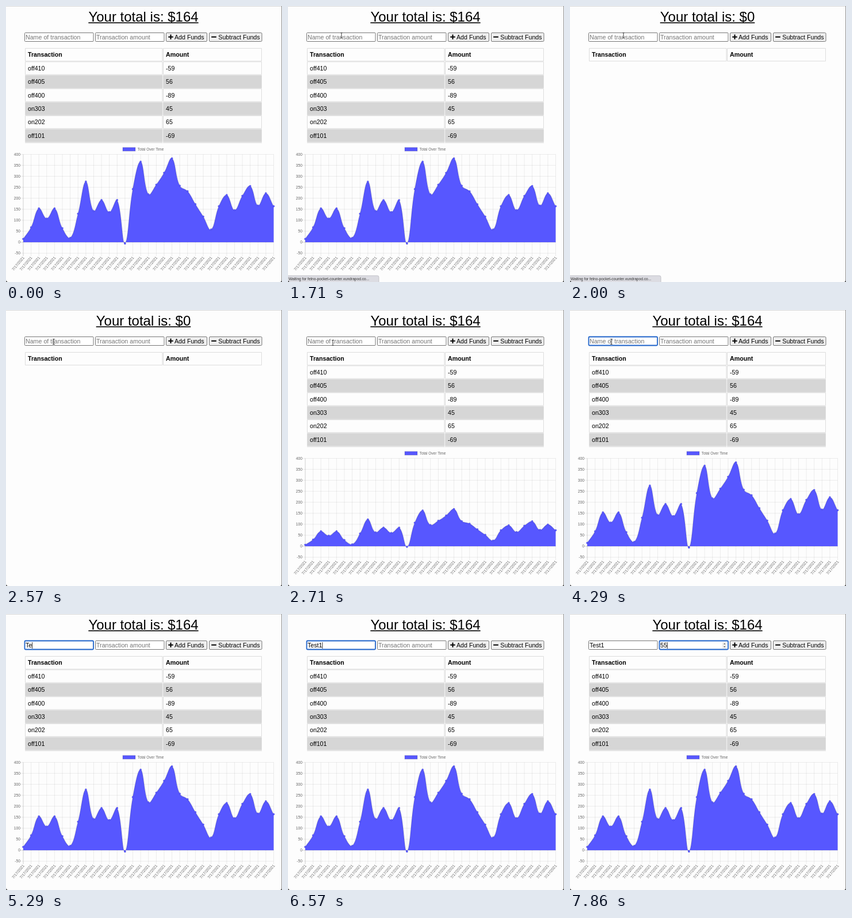
These frames come from a looping animation (480x479 px, 8 s). An HTML page with a canvas:

```html
<!DOCTYPE html>
<html lang="en">
<head>
<meta charset="utf-8">
<title>Budget</title>
<style>
html, body { margin: 0; width: 100%; height: 100%; overflow: hidden; background: #fdfdfd; }
canvas { display: block; }
</style>
</head>
<body>
<canvas width="480" height="479"></canvas>
<script>
const ctx = document.querySelector('canvas').getContext('2d');
const LOOP = 8000, BLUE = '#5757ff', FAINT = 'rgba(0,0,0,.1)';
const UI = 10.67, SMALL = 6.7;

const rows = [['off410', -59], ['off405', 56], ['off400', -89], ['on303', 45], ['on202', 65], ['off101', -69]];
const totals = [15, 68, 154, 108, 154, 64, 20, 130, 276, 142, 192, 137, 192, -6, 242, 367, 218,
  262, 316, 382, 257, 232, 173, 117, 58, 164, 215, 146, 211, 256, 167, 223, 164];

// Page loads: blank from, data shown at
const loads = [[430, 860], [2000, 2575]];
const statusTimes = [[140, 860], [1430, 2290]];
const pointer = [[1140, 93, 51], [2290, 93, 51], [2710, 78, 57], [3430, 72, 55], [5000, 72, 55]];
const NAME_FOCUS = 3570, AMOUNT_FOCUS = 6860;
const nameKeys = [5000, 5290, 5570, 5860, 6290], amountKeys = [7290, 7570];

const plot = { left: 30, right: 465.5, top: 257.5, zero: 410, bottom: 429 };
const step = (plot.right - plot.left) / (totals.length - 1);
const unit = (plot.zero - plot.top) / 400;
const points = totals.map((v, i) => ({ x: plot.left + i * step, y: plot.zero - v * unit }));

const within = (t, spans) => spans.some(([a, b]) => t >= a && t < b);
const clamp = (v, min, max) => Math.min(max, Math.max(min, v));

function drawText(s, x, y, { size = UI, color = '#000', align = 'left', weight = 'normal' } = {}) {
  ctx.font = `${weight} ${size}px "Liberation Sans", Arial, sans-serif`;
  ctx.fillStyle = color;
  ctx.textAlign = align;
  ctx.fillText(s, x, y);
}

function drawRect(x, y, w, h, color) {
  ctx.fillStyle = color;
  ctx.fillRect(x, y, w, h);
}

function drawLine(x1, y1, x2, y2, color, width = 1) {
  ctx.strokeStyle = color;
  ctx.lineWidth = width;
  ctx.beginPath();
  ctx.moveTo(x1, y1);
  ctx.lineTo(x2, y2);
  ctx.stroke();
}

function drawBox(x, y, w, h, fill, stroke, radius = 0, width = 1) {
  ctx.beginPath();
  ctx.roundRect(x, y, w, h, radius);
  ctx.fillStyle = fill;
  ctx.fill();
  ctx.strokeStyle = stroke;
  ctx.lineWidth = width;
  ctx.stroke();
}

function drawTitle(total) {
  const s = 'Your total is: $' + total;
  drawText(s, 239, 26.5, { size: 24, align: 'center' });
  const half = ctx.measureText(s).width / 2;
  drawRect(239 - half, 28.4, half * 2, 1.6, '#000');
}

function drawField(x, placeholder, value, focused, caretAge) {
  if (focused) drawBox(x + .5, 46.5, 119.5, 15, '#fff', '#1f63c9', 1.5, 1.8);
  else drawBox(x + .5, 46.5, 119.5, 15, '#fff', '#767676', 1);
  drawText(value || placeholder, x + 2, 57.6, { color: value ? '#000' : '#757575' });
  if (focused && caretAge % 1000 < 500) {
    const w = value ? ctx.measureText(value).width : 0;
    drawRect(x + 2 + w, 49, .8, 11, '#000');
  }
}

function drawSpinner() {
  drawBox(265, 49, 7, 10.5, '#eee', '#e4e4e4', 1, .5);
  ctx.fillStyle = '#555';
  for (const dir of [-1, 1]) {
    ctx.beginPath();
    ctx.moveTo(267, 54.2 + dir * 1.7);
    ctx.lineTo(270.4, 54.2 + dir * 1.7);
    ctx.lineTo(268.7, 54.2 + dir * 3.8);
    ctx.fill();
  }
}

function drawForm(t) {
  const typed = (s, keys) => s.slice(0, keys.filter(k => t >= k).length);
  const age = (focus, keys) => t - Math.max(focus, ...keys.filter(k => t >= k));
  const onAmount = t >= AMOUNT_FOCUS;
  drawField(32, 'Name of transaction', typed('Test1', nameKeys),
    t >= NAME_FOCUS && !onAmount, age(NAME_FOCUS, nameKeys));
  drawField(155, 'Transaction amount', typed('55', amountKeys), onAmount, age(AMOUNT_FOCUS, amountKeys));
  if (onAmount) drawSpinner();

  drawBox(278.5, 46.5, 71, 15, '#efefef', '#767676', 1.5);
  drawRect(282.3, 52.7, 8.4, 2, '#000');
  drawRect(285.5, 49.5, 2, 8.4, '#000');
  drawText('Add Funds', 293, 57.6);
  drawBox(353.5, 46.5, 91.5, 15, '#efefef', '#767676', 1.5);
  drawRect(357.2, 52.7, 8.6, 2, '#000');
  drawText('Subtract Funds', 369.3, 57.6);
}

function drawRow(i, name, amount, weight) {
  const y = 73.5 + 23.4 * i;
  const fill = i && i % 2 === 0 ? '#d6d6d6' : '#fdfdfd';
  drawBox(33.5, y, 238.5, 22.2, fill, '#ddd');
  drawBox(273.5, y, 171, 22.2, fill, '#ddd');
  drawText(name, 38, y + 14.8, { weight });
  drawText(amount, 278, y + 14.8, { weight });
}

function drawTable(loaded) {
  ctx.save();
  ctx.beginPath();
  ctx.rect(0, 70, 480, 168);
  ctx.clip();
  drawRow(0, 'Transaction', 'Amount', 'bold');
  if (loaded) {
    rows.forEach(([name, amount], i) => drawRow(i + 1, name, amount));
    drawRow(7, '', '');
  }
  ctx.restore();
}

// Smooth curve with tension .4, control points kept inside the plot
const controls = points.map((p, i) => {
  const a = points[i - 1] || p, b = points[i + 1] || p;
  const da = Math.hypot(p.x - a.x, p.y - a.y), db = Math.hypot(b.x - p.x, b.y - p.y);
  const at = k => ({
    x: clamp(p.x + k * (b.x - a.x), plot.left, plot.right),
    y: clamp(p.y + k * (b.y - a.y), plot.top, plot.bottom)
  });
  return { before: at(-.4 * da / (da + db)), after: at(.4 * db / (da + db)) };
});

function drawArea(grow) {
  const { left, right, zero } = plot;
  const scaled = y => zero + (y - zero) * grow;
  const trace = () => {
    ctx.beginPath();
    ctx.moveTo(left, scaled(points[0].y));
    points.slice(1).forEach((p, i) => {
      const a = controls[i].after, b = controls[i + 1].before;
      ctx.bezierCurveTo(a.x, scaled(a.y), b.x, scaled(b.y), p.x, scaled(p.y));
    });
  };
  trace();
  ctx.lineTo(right, zero);
  ctx.lineTo(left, zero);
  ctx.fillStyle = BLUE;
  ctx.fill();

  trace();
  ctx.strokeStyle = FAINT;
  ctx.lineWidth = 1.6;
  ctx.stroke();

  ctx.lineWidth = .6;
  for (const p of points) {
    ctx.beginPath();
    ctx.arc(p.x, scaled(p.y), 1.7, 0, 7);
    ctx.fill();
    ctx.stroke();
  }
}

function drawChart(grow) {
  const label = { size: SMALL, color: '#666' };
  const gridColor = main => main ? 'rgba(0,0,0,.25)' : FAINT;
  drawBox(203, 245.5, 22, 6.3, BLUE, FAINT, 0, 1.4);
  drawText('Total Over Time', 228.7, 251, { ...label, size: 6.5 });

  for (let v = -50; v <= 400; v += 50) {
    const y = plot.zero - v * unit;
    drawLine(plot.left - 5, y, plot.right, y, gridColor(v === 0), .7);
    drawText(v, 25, y + 2.4, { ...label, align: 'right' });
  }
  points.forEach(({ x }, i) => {
    drawLine(x, plot.top, x, plot.bottom + 5, gridColor(i === 0), .7);
    ctx.save();
    ctx.translate(x + .5, 435.5);
    ctx.rotate(-50 * Math.PI / 180);
    drawText('7/17/2021', 0, 2.4, { ...label, align: 'right' });
    ctx.restore();
  });
  drawArea(grow);
}

function drawStatus() {
  drawBox(-2, 468, 160, 14, '#dcdce2', '#b9b9bf', 2.5, .8);
  drawText('Waiting for felno-pocket-counter.vundrapod.co...', 1, 476.2, { size: 6.6, color: '#333' });
}

function drawPointer(t) {
  const i = pointer.findIndex(p => t < p[0]);
  if (i < 1) return;
  const [t0, x0, y0] = pointer[i - 1], [t1, x1, y1] = pointer[i];
  const k = (t - t0) / (t1 - t0);
  const x = x0 + (x1 - x0) * k, y = y0 + (y1 - y0) * k;
  const beam = (color, width) => {
    drawLine(x, y - 4, x, y + 4, color, width);
    for (const end of [y - 4.5, y + 4.5]) drawLine(x - 1.8, end, x + 1.8, end, color, width);
  };
  beam('rgba(255,255,255,.8)', 2);
  beam('#222', .9);
}

function drawWindowEdge() {
  drawLine(0, .2, 480, .2, '#aaa', .6);
  drawLine(479.5, 0, 479.5, 479, '#858585', .9);
  ctx.fillStyle = '#222';
  for (const [x, dir] of [[0, 1], [480, -1]]) {
    ctx.beginPath();
    ctx.moveTo(x, 475);
    ctx.quadraticCurveTo(x, 479, x + 4 * dir, 479);
    ctx.lineTo(x, 479);
    ctx.fill();
  }
}

function draw() {
  const t = performance.now() % LOOP;
  const loaded = !within(t, loads);
  const last = loads.filter(l => t >= l[1]).pop();
  const progress = last ? Math.min(1, (t - last[1]) / 1000) : 1;

  drawRect(0, 0, 480, 479, '#fdfdfd');
  drawTitle(loaded ? 164 : 0);
  drawForm(t);
  drawTable(loaded);
  if (loaded) drawChart(1 - (1 - progress) ** 4);
  if (within(t, statusTimes)) drawStatus();
  drawPointer(t);
  drawWindowEdge();
  requestAnimationFrame(draw);
}
draw();
</script>
</body>
</html>
```
